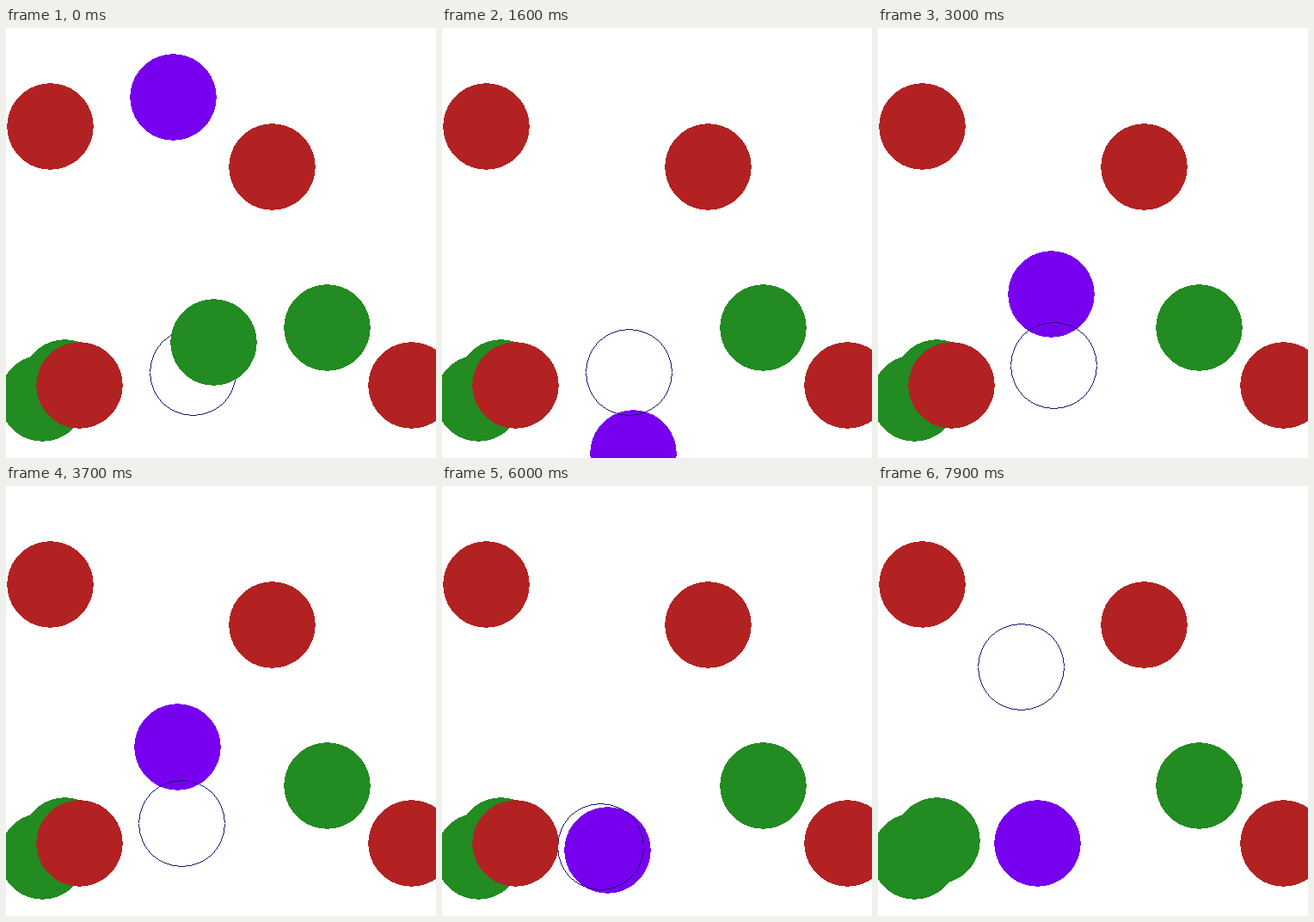
Write an HTML page that moves like this. It is 500 px wide and 500 px high and loops after 8 s.

```html
<!DOCTYPE html>
<html lang="en">
<head>
<meta charset="utf-8">
<title>Circles</title>
<style>
  html, body { margin: 0; width: 100%; height: 100%; overflow: hidden; background: #fff; }
  svg { display: block; width: 100%; height: 100%; shape-rendering: crispEdges; }
  circle { r: 50.15px; }
  .good { fill: #228b22; }
  .bad { fill: #b22222; }
  #agent { fill: #7700ee; }
  #goal { fill: #191970; }
</style>
</head>
<body>
<svg viewBox="0 0 500 500">
  <circle id="agent"/>
  <path id="goal"/>
  <g class="good">
    <circle cx="42.5" cy="430.5"/>
    <circle cx="68.5" cy="412.5"/>
    <circle cx="373.5" cy="348.5"/>
    <circle id="eaten" cx="241.5" cy="365.5"/>
  </g>
  <g class="bad">
    <circle cx="51.5" cy="114.5"/>
    <circle cx="309.5" cy="161.5"/>
    <circle cx="471.5" cy="415.5"/>
    <circle id="hit" cx="85.5" cy="415.5"/>
  </g>
</svg>
<script>
  const STEP = 100, STEPS = 80, RADIUS = 50;
  const EATEN_AT = 7, HIT_AT = 64;

  // Turning points of the swing on each axis: [step, position]
  const swingX = [[0, 194.5], [15.3, 222.5], [34.2, 198.5], [51.3, 216.5], [64, 185.5]];
  const swingY = [[0, 80.5], [14.6, 497], [33.6, 291.5], [52.3, 440.5], [62, 422], [78, 420.5], [79, 415.5]];
  const goals = [[0, 217, 400], [18, 204, 392], [48, 184, 419], [78, 166, 210]];

  const [agent, goal, eaten, hit] = ['agent', 'goal', 'eaten', 'hit']
    .map(id => document.getElementById(id));

  const lastAt = (list, n) => list.findLastIndex(k => k[0] <= n);
  const snap = v => Math.floor(v) + .5;

  // Sine easing from one turning point to the next, then rest
  function swing(points, n) {
    const i = lastAt(points, n);
    const [t0, a] = points[i];
    if (i === points.length - 1) return a;
    const [t1, b] = points[i + 1];
    return a + (b - a) * (1 - Math.cos(Math.PI * (n - t0) / (t1 - t0))) / 2;
  }

  // Ring one pixel wide, built by octants and open at its left and right ends
  function ring(r) {
    const dot = (x, y) => `M${x} ${y}h1v1h-1z`;
    const reach = Math.floor(r * Math.SQRT1_2);
    let d = '';
    for (let a = -reach; a <= reach; a++) {
      const b = Math.floor(Math.sqrt(r * r - a * a) + Math.abs(a) / (2 * r) + .125);
      d += dot(a, b) + dot(a, -b);
      if (a) d += dot(b, a) + dot(-b, a);
    }
    return d;
  }

  function draw(time) {
    const n = Math.floor(time / STEP) % STEPS;
    const [, x, y] = goals[lastAt(goals, n)];
    agent.setAttribute('cx', snap(swing(swingX, n)));
    agent.setAttribute('cy', snap(swing(swingY, n)));
    goal.setAttribute('transform', `translate(${x} ${y})`);
    eaten.style.display = n < EATEN_AT ? '' : 'none';
    hit.style.display = n < HIT_AT ? '' : 'none';
  }

  function tick() {
    draw(performance.now());
    requestAnimationFrame(tick);
  }

  goal.setAttribute('d', ring(RADIUS));
  draw(0);
  requestAnimationFrame(tick);
</script>
</body>
</html>
```
